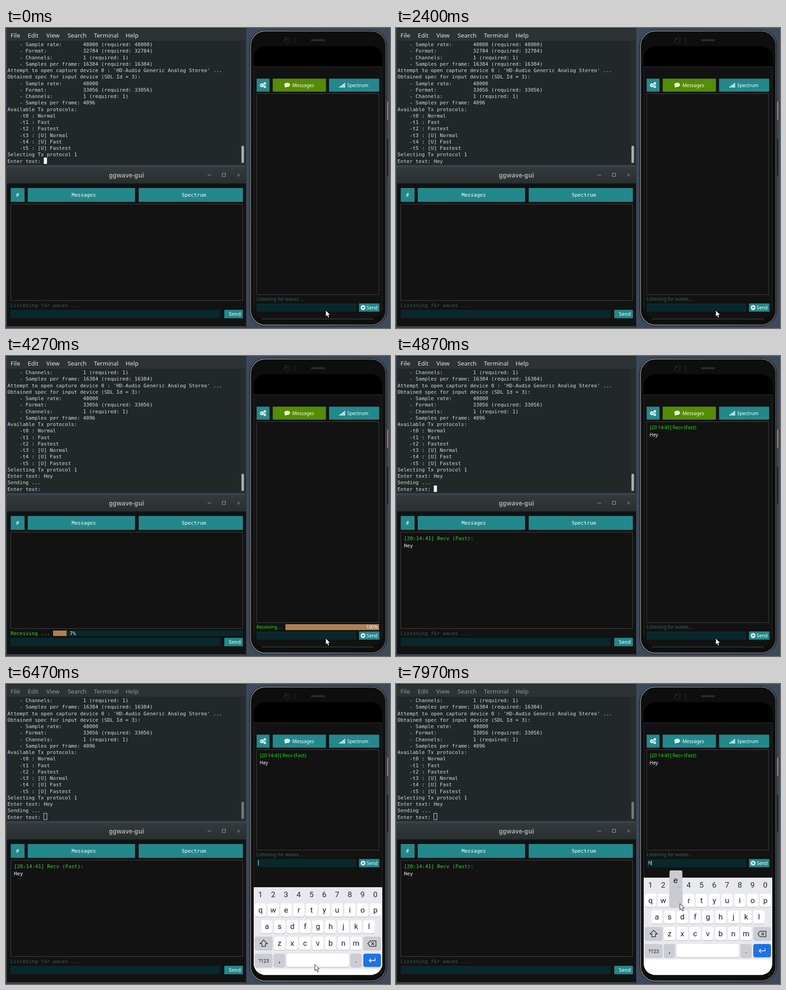
Recreate the animation shown at these times as an HTML page with a canvas. Size 848 by 660 pixels, loop 8000 ms.

```html
<!DOCTYPE html>
<html lang="en">
<head>
<meta charset="utf-8">
<title>ggwave-gui</title>
<style>
html, body { margin: 0; width: 100%; height: 100%; overflow: hidden; background: #36444f; }
canvas { display: block; }
</style>
</head>
<body>
<canvas id="stage" width="848" height="660"></canvas>
<script>
const g = document.getElementById('stage').getContext('2d');
const LOOP = 8000, TEAL = '#21898b', FIELD = '#08282b', APP = '#121212', BAR = '#b07f51';
const MONO = '11.1px "DejaVu Sans Mono", monospace', ADVANCE = 6.68;
const UI = '13.3px "Noto Sans", sans-serif';
const TITLE = 'bold 13.4px "Noto Sans", sans-serif';
const PHONE = '10.3px "Noto Sans", sans-serif';
const KEY = '17px Roboto, sans-serif';

// timeline in ms
const TYPED = [[1300, 'H'], [1440, 'e'], [1600, 'y']];
const ENTER = 2425, BLINK = 530, CLICK = 6230;
const GUI_RX = { from: 3160, full: 4310, done: 4430 };
const PHONE_RX = { from: 3230, full: 4220, done: 4400 };
const POINTER = [[0, 706, 621], [5600, 706, 621], [5770, 682, 617], [6620, 682, 617],
  [7130, 719, 516], [7420, 719, 516], [7900, 627, 483], [8000, 627, 483]];
const PRESSES = [['h', 7220, 7380], ['e', 7910, 8100]];

const LOG = `    - Sample rate:       48000 (required: 48000)
    - Format:            32784 (required: 32784)
    - Channels:          1 (required: 1)
    - Samples per frame: 16384 (required: 16384)
Attempt to open capture device 0 : 'HD-Audio Generic Analog Stereo' ...
Obtained spec for input device (SDL Id = 3):
    - Sample rate:       48000
    - Format:            33056 (required: 33056)
    - Channels:          1 (required: 1)
    - Samples per frame: 4096
Available Tx protocols:
    -t0 : Normal
    -t1 : Fast
    -t2 : Fastest
    -t3 : [U] Normal
    -t4 : [U] Fast
    -t5 : [U] Fastest
Selecting Tx protocol 1`.split('\n');

function rect(x, y, w, h, color, r = 0) {
  g.fillStyle = color;
  g.beginPath();
  g.roundRect(x, y, w, h, r);
  g.fill();
}
function frame(x, y, w, h, color, r = 0, width = 1) {
  g.strokeStyle = color;
  g.lineWidth = width;
  g.beginPath();
  g.roundRect(x, y, w, h, r);
  g.stroke();
}
function text(s, x, y, color, font, align = 'left') {
  g.fillStyle = color;
  g.font = font;
  g.textAlign = align;
  g.fillText(s, x, y);
}
function disc(x, y, r, color) {
  g.fillStyle = color;
  g.beginPath();
  g.arc(x, y, r, 0, 7);
  g.fill();
}
function line(points, color, width = 1) {
  g.strokeStyle = color;
  g.lineWidth = width;
  g.beginPath();
  points.forEach(([x, y]) => g.lineTo(x, y));
  g.stroke();
}
function shape(points, color) {
  g.fillStyle = color;
  g.beginPath();
  points.forEach(([x, y]) => g.lineTo(x, y));
  g.closePath();
  g.fill();
}
const shift = (x, y, points) => points.map(([a, b]) => [x + a, y + b]);

function terminal(t) {
  const focused = t < CLICK;
  rect(2, 0, 527, 301.5, '#22282a');
  rect(2, 2, 527, 26, '#2d3334');
  [['File', 10], ['Edit', 48], ['View', 89], ['Search', 136], ['Terminal', 194], ['Help', 264]]
    .forEach(([s, x]) => text(s, x, 21, focused ? '#dfe2e1' : '#929796', UI));
  rect(517, 28, 12, 273, '#272d2f');
  rect(520, 259, 5.5, 38, focused ? '#abafae' : '#747979', 3);

  const typed = TYPED.filter(k => t >= k[0]);
  const word = typed.map(k => k[1]).join('');
  const lines = [...LOG, 'Enter text: ' + word];
  if (t >= ENTER) lines.push('Sending ...', 'Enter text: ');
  lines.slice(-19).forEach((s, i) => text(s, 3.3, 40 + i * 14.26, '#d6dad8', MONO));

  const x = 83.5 + (t < ENTER ? word.length * ADVANCE : 0);
  const since = t >= ENTER ? t - ENTER : typed.length ? t - typed[typed.length - 1][0] : t;
  if (!focused) frame(Math.round(x) - .5, 284.5, 7, 14, '#d6dad8');
  else if (Math.floor(since / BLINK) % 2 === 0) rect(x, 285, 7, 14, '#f2f4f3');
}

// reception status: label alone, or label with progress bar
function status(t, rx, x, y, barX, right, font, idle, live, barH) {
  if (t < rx.from || t >= rx.done) {
    text('Listening for waves ...', x, y, idle, font);
    return;
  }
  const done = t >= rx.full ? 1 : (t - rx.from) * 6.4e-5;
  const w = right - barX, end = barX + w * done, label = Math.round(done * 100) + '%';
  text('Receiving ...', x, y, live, font);
  rect(barX, y - 10, w, barH, FIELD);
  rect(barX, y - 10, w * done, barH, BAR);
  if (done === 1) text(label, right - 3, y, '#fff', font, 'right');
  else text(label, end + 7, y, '#fff', font);
}

function button(x, y, w, h, label, labelX) {
  rect(x, y, w, h, TEAL);
  text(label, labelX, y + h / 2 + 4, '#fff', MONO);
}

function desktopApp(t) {
  rect(2, 306, 528, 350, APP, [7, 7, 0, 0]);
  const bar = g.createLinearGradient(0, 306, 0, 342);
  bar.addColorStop(0, '#343a3b');
  bar.addColorStop(1, '#292f30');
  rect(2, 306, 528, 36, bar, [7, 7, 0, 0]);
  text('ggwave-gui', 266, 328.5, '#a3a8a7', TITLE, 'center');
  line([[445, 323.5], [453, 323.5]], '#a3a8a7');
  frame(477.5, 319.5, 7, 7, '#a3a8a7');
  line([[510.5, 320.5], [516.5, 326.5]], '#a3a8a7');
  line([[516.5, 320.5], [510.5, 326.5]], '#a3a8a7');

  button(10.5, 352, 30.5, 30.5, '#', 22);
  button(48, 352, 237, 30.5, 'Messages', 145);
  button(293, 352, 230, 30.5, 'Spectrum', 388);
  frame(10.5, 387.5, 512, 212, '#454545');
  if (t >= GUI_RX.done) {
    text('[20:14:41] Recv (Fast):', 17.5, 405, '#2fdc2f', MONO);
    text('Hey', 17.5, 421, '#fff', MONO);
  }
  status(t, GUI_RX, 10, 614, 104, 523, MONO, '#3d5955', '#3fd53f', 12);
  rect(10.5, 620, 463.5, 18, FIELD);
  button(482, 620, 41, 18.5, 'Send', 492);
}

function gear(x, y, r, hole) {
  for (let i = 0; i < 8; i++) {
    const a = i * Math.PI / 4;
    line([[x, y], [x + Math.cos(a) * (r + 1.2), y + Math.sin(a) * (r + 1.2)]], '#fff', 1.5);
  }
  disc(x, y, r, '#fff');
  disc(x, y, hole, TEAL);
}

function phoneBody() {
  rect(841.5, 162, 2.5, 40, '#d9826f', 1);
  rect(841.5, 244, 2.5, 81, '#1b1f24', 1);
  const rim = g.createLinearGradient(537, 0, 842, 0);
  rim.addColorStop(0, '#6d7073');
  rim.addColorStop(.04, '#85878a');
  rim.addColorStop(.96, '#66686b');
  rim.addColorStop(1, '#4b4d50');
  rect(537.5, 4, 304, 652, '#1b1d1f', 35);
  frame(540, 6.5, 299, 647, rim, 32, 2);
  rect(541.5, 8, 296, 644, '#0e0e0f', 31);
  rect(547, 40, 284, 600, '#000', 25);
  disc(621, 27, 7.5, '#1b1b1c');
  disc(621, 27, 4.5, '#090a0c');
  disc(619.5, 25.5, 1.5, '#43474b');
  rect(636, 21, 6, 13, '#171717', 3);
  rect(673, 24.5, 32, 4.5, '#2a2a2b', 2.2);
  line([[566, 640], [812, 640]], '#707070');
}

function phoneApp(t) {
  const open = t >= CLICK + 90, up = open ? 221 : 0;
  const active = t < CLICK ? '#538d02' : TEAL;
  rect(547, 85, 284, 554.5, APP);
  line([[547, 85.5], [831, 85.5]], '#3a3a3a');
  line([[547.5, 85], [547.5, 640]], '#2b2b2b');
  line([[830.5, 85], [830.5, 640]], '#2b2b2b');

  rect(553.5, 111.5, 28.5, 28.5, TEAL);
  gear(565, 126, 3.4, 1.5);
  gear(571.5, 122, 1.8, .8);
  gear(571.5, 129.3, 1.8, .8);
  rect(589, 111.5, 117.5, 28.5, active);
  g.fillStyle = '#fff';
  g.beginPath();
  g.ellipse(621, 125, 6.3, 4.6, 0, 0, 7);
  g.fill();
  shape([[616, 127], [615.5, 131.5], [621, 129]], '#fff');
  [618, 621, 624].forEach(x => disc(x, 125, .8, active));
  text('Messages', 632.5, 129.5, '#fff', PHONE);
  rect(713.5, 111.5, 110.5, 28.5, TEAL);
  for (let i = 0; i < 5; i++) rect(736 + i * 2.7, 129 - i * 2, 1.8, 2 + i * 2, '#fff');
  text('Spectrum', 753.5, 129.5, '#fff', PHONE);

  frame(553.5, 144.5, 270, 442 - up, '#414141');
  if (t >= PHONE_RX.done) {
    text('[20:14:41] Recv (Fast):', 560.5, 160.5, '#0bf00b', PHONE);
    text('Hey', 560, 177, '#fff', PHONE);
  }
  status(t, PHONE_RX, 553, 600 - up, 617, 824, PHONE, '#30686b', '#17e817', 13);
  rect(553.5, 606 - up, 220, 18, FIELD);
  rect(779.5, 606 - up, 45, 18, TEAL);
  disc(788.5, 615 - up, 5.2, '#fff');
  shape([[787, 612 - up], [787, 618 - up], [792, 615 - up]], TEAL);
  text('Send', 796.5, 619 - up, '#fff', PHONE);

  if (open) {
    const hasH = t >= 7380;
    if (hasH) text('h', 557, 397, '#fff', PHONE);
    rect(hasH ? 563.5 : 557, 388, 1, 11, '#fff');
  }
}

function key(s, x, y, w = 25, color = '#fff', font = KEY) {
  rect(x - w / 2, y - 14, w, 30, '#c4c6cc', 4.5);
  rect(x - w / 2, y - 14.5, w, 29, color, 4.5);
  text(s, x, y + 5.5, '#1f2124', font, 'center');
}

function keyboard(t) {
  if (t < CLICK + 60) return;
  const p = Math.min(1, (t - CLICK - 60) / 330);
  const GRAY = '#cbcdd3', INK = '#33363a', pos = {};
  g.save();
  g.beginPath();
  g.roundRect(547, 40, 284, 600, 25);
  g.clip();
  g.translate(0, 214 * (1 - p) ** 2.9);
  rect(547, 426, 284, 230, '#fff');
  rect(547, 426, 284, 180, '#e8e9ee');
  [...'1234567890'].forEach((s, i) => text(s, 561.8 + i * 28.2, 448, '#2a2c30', KEY, 'center'));
  [['qwertyuiop', 562, 476], ['asdfghjkl', 576, 512.5], ['zxcvbnm', 604, 549]].forEach(([row, x, y]) =>
    [...row].forEach((s, i) => key(s, pos[s] = x + i * 28.2, y)));
  key('', 569, 549, 39, GRAY);
  key('', 808.5, 549, 39, GRAY);
  key('?123', 569, 586.5, 39, GRAY, '11px Roboto, sans-serif');
  key(',', 604, 586.5, 25, GRAY);
  key('', 688.5, 586.5, 138);
  key('.', 773, 586.5, 25, GRAY);
  key('', 808.5, 586.5, 39, '#1a73e8');
  line(shift(569, 549, [[0, -7], [8, 1], [4, 1], [4, 7], [-4, 7], [-4, 1], [-8, 1], [0, -7], [1, -6]]), INK, 1.5);
  line(shift(808, 550, [[-9, 0], [-4, -6], [9, -6], [9, 6], [-4, 6], [-9, 0], [-8, -1]]), INK, 1.5);
  line(shift(810, 550, [[-3, -3], [3, 3]]), INK, 1.5);
  line(shift(810, 550, [[3, -3], [-3, 3]]), INK, 1.5);
  line(shift(808, 586, [[7, -4], [7, 1], [-6, 1]]), '#fff', 1.6);
  line(shift(808, 586, [[-2, -3], [-6, 1], [-2, 5]]), '#fff', 1.6);

  const press = PRESSES.find(([, from, to]) => t >= from && t < to);
  if (press) {
    const x = pos[press[0]], y = press[0] === 'e' ? 410 : 446.5;
    rect(x - 14.5, y, 28.5, 82, '#b9bbc1', 4);
    rect(x - 14, y, 27.5, 81, '#c9cbd1', 4);
    text(press[0], x - .8, y + 28, '#1f2124', '19px Roboto, sans-serif', 'center');
    if (press[0] === 'e') text('...', x + 7, y + 37, '#44474b', '9px Roboto, sans-serif', 'center');
  }
  g.restore();
}

function pointer(t) {
  const i = POINTER.findIndex((p, n) => n && t <= p[0]);
  const [t0, x0, y0] = POINTER[i - 1], [t1, x1, y1] = POINTER[i];
  const u = (t - t0) / (t1 - t0), e = u * u * (3 - 2 * u);
  const arrow = shift(x0 + (x1 - x0) * e, y0 + (y1 - y0) * e,
    [[0, 0], [0, 14], [3.2, 11.2], [5.5, 16.5], [8, 15.4], [5.7, 10.3], [10, 10], [0, 0], [0, 1]]);
  shape(arrow, '#fff');
  line(arrow, '#111', 1);
}

function draw(t) {
  rect(0, 0, 848, 660, '#36444f');
  rect(531, 0, 317, 660, '#3d4a5b');
  rect(529, 0, 2, 660, '#2b3640');
  terminal(t);
  desktopApp(t);
  phoneBody();
  g.save();
  g.beginPath();
  g.roundRect(547, 40, 284, 600, 25);
  g.clip();
  phoneApp(t);
  g.restore();
  keyboard(t);
  pointer(t);
}

const start = performance.now();
function tick() {
  draw((performance.now() - start) % LOOP);
  requestAnimationFrame(tick);
}
tick();
</script>
</body>
</html>
```
